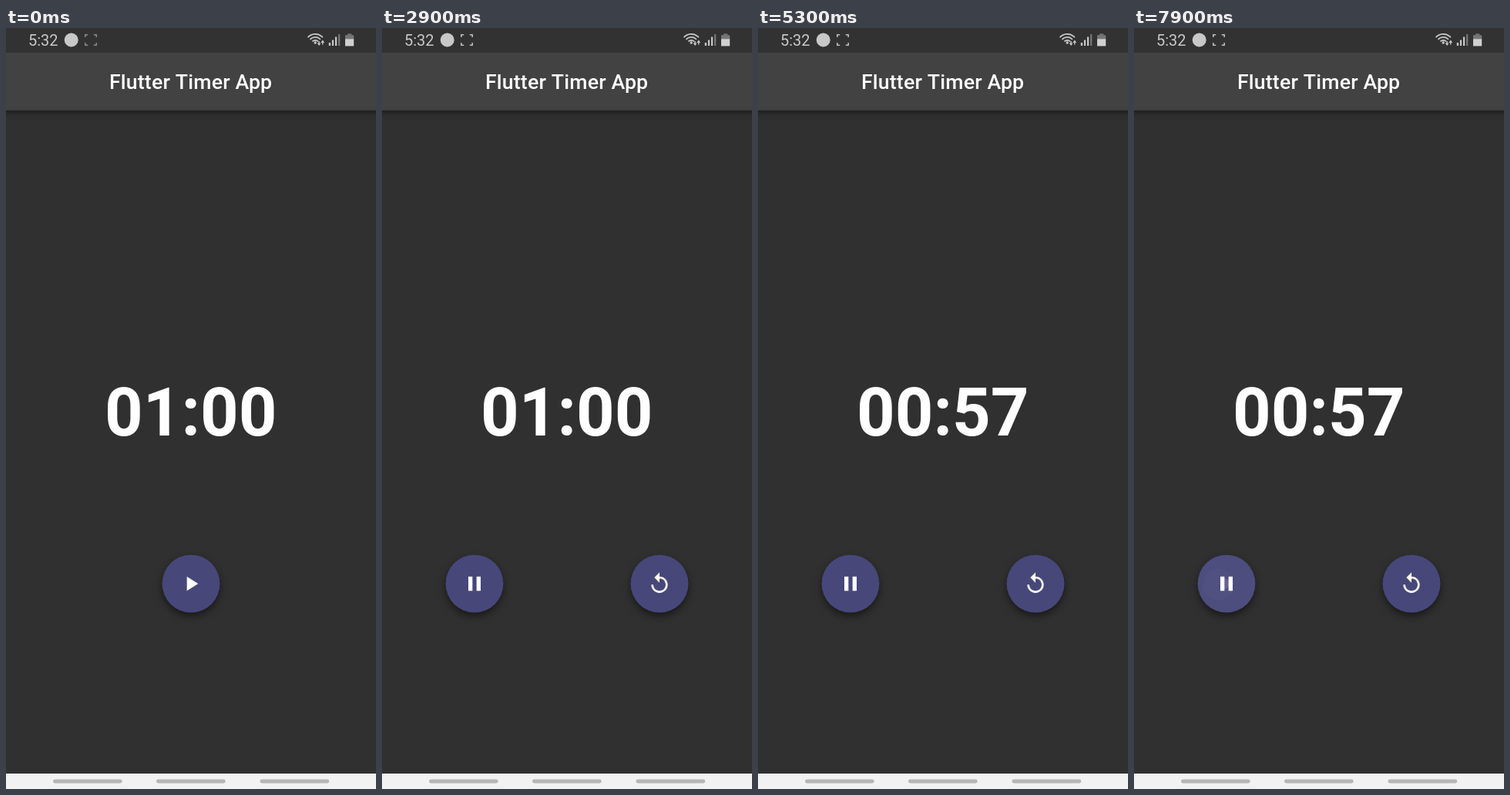
These frames come from a looping animation (480x986 px, 8 s). An HTML page with a canvas:

```html
<!DOCTYPE html>
<html lang="en">
<head>
<meta charset="utf-8">
<title>Timer</title>
<style>
html, body { margin: 0; width: 100%; height: 100%; overflow: hidden; background: #303030; }
canvas { display: block; width: 100vw; height: 100vh; }
</style>
</head>
<body>
<canvas id="stage"></canvas>
<script>
const W = 480, H = 986, LOOP = 8000;
const canvas = document.getElementById('stage');
const ctx = canvas.getContext('2d');
const ratio = window.devicePixelRatio || 1;
canvas.width = W * ratio;
canvas.height = H * ratio;

const LIGHT = '#c8c8c8';
const BUTTON = '#47477a';
const ICONS = {
  play: new Path2D('M8 5v14l11-7z'),
  pause: new Path2D('M6 19h4V5H6zM14 5v14h4V5z'),
  reset: new Path2D('M12 5V1L7 6l5 5V7c3.31 0 6 2.69 6 6s-2.69 6-6 6-6-2.69-6-6H4c0 4.42 3.58 8 8 8s8-3.58 8-8-3.58-8-8-8z')
};

// Press highlight of the left button: [start ms, strength]
const GLOW = [[0, 0], [2300, .18], [2400, .09], [2500, 0],
  [6100, .08], [6200, .14], [6300, .07], [6400, .03]];

function rect(x, y, w, h, color) {
  ctx.fillStyle = color;
  ctx.fillRect(x, y, w, h);
}

function disc(x, y, r, color) {
  ctx.fillStyle = color;
  ctx.beginPath();
  ctx.arc(x, y, r, 0, 7);
  ctx.fill();
}

function shadow(dy, blur, alpha) {
  ctx.shadowColor = `rgba(0,0,0,${alpha})`;
  ctx.shadowOffsetY = dy * ratio;
  ctx.shadowBlur = blur * ratio;
}

function poly(points, color) {
  ctx.fillStyle = color;
  ctx.beginPath();
  points.forEach(([x, y]) => ctx.lineTo(x, y));
  ctx.fill();
}

function label(str, x, y, font, color, align = 'center', spacing = 0) {
  ctx.font = `${font} Roboto, sans-serif`;
  ctx.letterSpacing = spacing + 'px';
  ctx.textAlign = align;
  ctx.fillStyle = color;
  ctx.fillText(str, x, y);
}

function icon(name, x, y, alpha = 1) {
  ctx.save();
  ctx.translate(x - 16, y - 16);
  ctx.scale(4 / 3, 4 / 3);
  ctx.globalAlpha = alpha;
  ctx.fillStyle = '#fff';
  ctx.fill(ICONS[name]);
  ctx.restore();
}

function button(name, x, glow = 0) {
  const y = 720, r = 37.33;
  ctx.save();
  shadow(4, 7, .28);
  disc(x, y, r, BUTTON);
  shadow(glow > .05 ? 8 : 5, glow > .05 ? 16 : 12, .26);
  disc(x, y, r, BUTTON);
  ctx.restore();
  if (glow) disc(x, y, r, `rgba(255,255,255,${glow})`);
  icon(name, x, y);
}

function recorder(t) {
  ctx.strokeStyle = t < 100 ? '#8c8c8c' : '#c0c0c0';
  ctx.lineWidth = 1.5;
  for (const sx of [-1, 1]) for (const sy of [-1, 1]) {
    ctx.beginPath();
    ctx.moveTo(110 + sx * 3.8, 15.5 + sy * 6.8);
    ctx.lineTo(110 + sx * 7.2, 15.5 + sy * 6.8);
    ctx.lineTo(110 + sx * 7.2, 15.5 + sy * 3.4);
    ctx.stroke();
  }
  const lit = Math.floor((t + 100) / 500) % 2 === 1;
  if (lit) {
    rect(105, 12, 6.6, 7, LIGHT);
    poly([[111.6, 15.5], [115, 12.5], [115, 18.5]], LIGHT);
  }
}

function wifi() {
  ctx.strokeStyle = LIGHT;
  ctx.lineWidth = 1.7;
  for (const r of [5, 9, 13]) {
    ctx.beginPath();
    ctx.arc(401.2, 20.8, r, -Math.PI * .77, -Math.PI * .23);
    ctx.stroke();
  }
  disc(401.2, 19, 1.7, LIGHT);
  rect(405.4, 17, 1.4, 4, LIGHT);
  poly([[403.7, 19.6], [408.5, 19.6], [406.1, 23]], LIGHT);
  rect(410.1, 18, 1.4, 3.5, LIGHT);
  poly([[408.4, 19], [413.2, 19], [410.8, 15.6]], LIGHT);
}

function statusBar(t) {
  rect(0, 0, W, 32, '#323232');
  label('5:32', 29, 23, '400 20px', LIGHT, 'left');
  disc(84.7, 15.5, 9, LIGHT);
  recorder(t);
  wifi();
  [4, 7.5, 11.5, 15].forEach((h, i) =>
    rect(418.8 + i * 4.1, 23 - h, 2.2, h, i < 3 ? LIGHT : '#777'));
  rect(443, 7.5, 5.4, 2, '#777');
  rect(440, 9.3, 11.2, 5, '#777');
  rect(440, 14.2, 11.2, 9.2, '#d0d0d0');
}

function appBar() {
  ctx.save();
  shadow(2, 5, .3);
  rect(-20, 0, W + 40, 106.67, '#424242');
  shadow(4, 10, .2);
  rect(-20, 0, W + 40, 106.67, '#424242');
  ctx.restore();
  label('Flutter Timer App', 239.6, 79, '500 26.67px', '#fff', 'center', .2);
}

function navBar() {
  rect(0, 966, W, 20, '#f2f2f2');
  ctx.fillStyle = '#b5b5b5';
  for (const x of [61, 195, 329.5]) {
    ctx.beginPath();
    ctx.roundRect(x, 973.6, 89.7, 4.8, 2.4);
    ctx.fill();
  }
}

function clock(t) {
  const left = 60 - Math.min(3, Math.max(0, Math.floor((t - 2300) / 1000)));
  const pad = n => String(n).padStart(2, '0');
  const text = pad(Math.floor(left / 60)) + ':' + pad(left % 60);
  label(text, 239.7, 528.2, '700 86.67px', '#fff');
}

function controls(t) {
  if (t < 2300) return button('play', 240);
  const paused = t >= 6100 && t < 7900;
  const glow = GLOW.filter(([start]) => start <= t).pop()[1];
  button(paused ? 'play' : 'pause', 120, glow);
  button('reset', 360);
  if (t >= 7900) {
    disc(109.5, 721, 20.5, 'rgba(255,255,255,.02)');
    icon('play', 120, 720, .12);
  }
}

function draw(t) {
  ctx.setTransform(ratio, 0, 0, ratio, 0, 0);
  rect(0, 0, W, H, '#303030');
  appBar();
  statusBar(t);
  clock(t);
  controls(t);
  navBar();
}

const began = performance.now();
function tick() {
  draw((performance.now() - began) % LOOP);
  requestAnimationFrame(tick);
}
tick();
</script>
</body>
</html>
```
